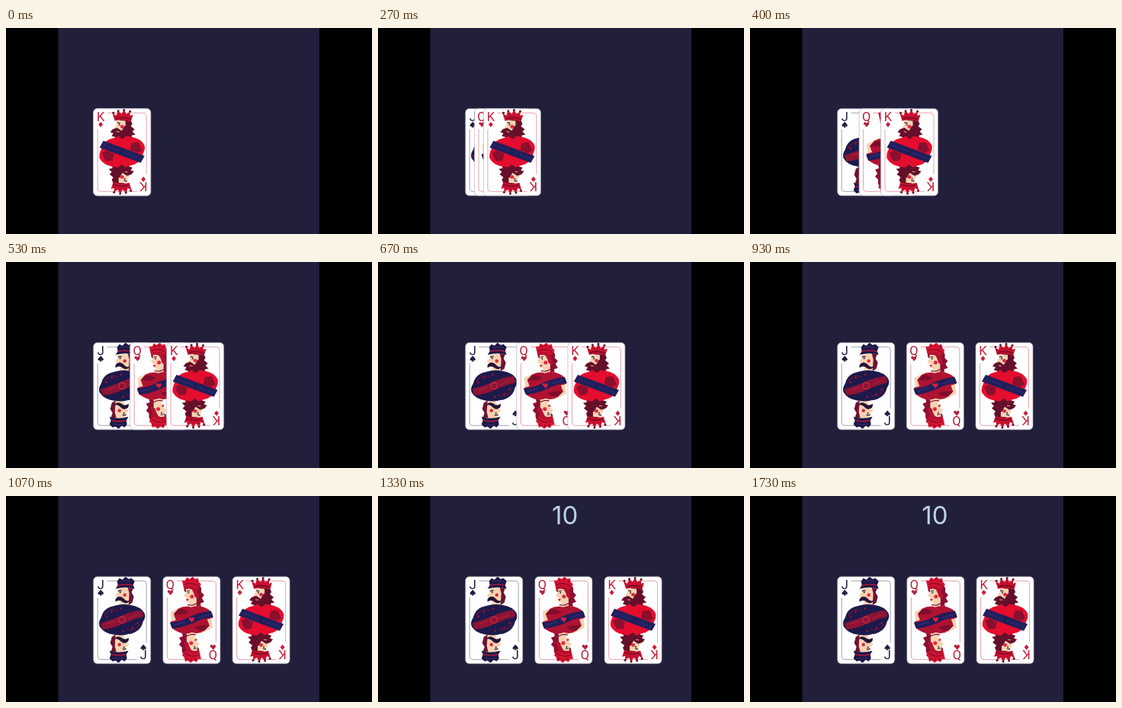
Animation, 480 px wide and 270 px high, one loop 2.19 s. Source, as an HTML page:

```html
<!DOCTYPE html>
<html lang="en">
<head>
<meta charset="utf-8">
<title>Three cards</title>
<style>
  html, body { margin: 0; width: 100%; height: 100%; overflow: hidden; background: #000; }
  svg { display: block; width: 480px; height: 270px; }
  text { font-family: Roboto, "Liberation Sans", sans-serif; text-anchor: middle; }
  #count { font-family: Inter, Roboto, sans-serif; }
</style>
</head>
<body>
<svg viewBox="0 0 480 270">
  <defs>
    <path id="spade" d="M0-3.8C1-2 3.7-.7 3.7 1.2C3.7 2.9 1.6 3 .6 1.8L1.5 3.8H-1.5L-.6 1.8C-1.6 3-3.7 2.9-3.7 1.2C-3.7-.7-1-2 0-3.8Z"/>
    <path id="heart" d="M0 3.6C-1-.1-3.6.6-3.6-1.4C-3.6-3.7-.8-3.8 0-1.8C.8-3.8 3.6-3.7 3.6-1.4C3.6.6 1 2 0 3.6Z"/>
    <path id="diamond" d="M0-3.5L3 0L0 3.5L-3 0Z"/>

    <g id="jackHead">
      <path fill="#6d1233" d="M43 14L52 15L50 21L53 26L51 34L45 38L41 30Z"/>
      <path fill="#f6d3b3" d="M33 14H45L47 22L46 38H34L35 33L31 31L32 27L28 25L32 20Z"/>
      <path fill="#1c1846" d="M31 6L34 2L38 4L42 0L46 3L50 2L54 6L52 11L54 16Q42 12 29 16L32 11Z"/>
      <path fill="none" stroke="#a3173a" stroke-width="1.8" d="M32 11.5Q42 8.5 52 11.5"/>
      <path fill="none" stroke="#3c2c6c" d="M35 6.5Q42 4 50 6.5"/>
      <path fill="#241535" d="M31 27Q36 24 40 29Q43 33 48 31Q44 37 38 33Q34 29 29 33Q28 29 31 27Z"/>
      <circle cx="41" cy="24" r="2.2" fill="#e3263f"/>
      <path stroke="#241535" stroke-width="1.3" d="M32 18.5L37 18"/>
      <circle cx="35" cy="20.5" r="1" fill="#241535"/>
    </g>
    <g id="jackBody">
      <path fill="#1d1a4b" d="M28 38Q37 35 48 37Q62 39 67 48Q69 54 65 59Q63 69 54 73Q47 76 47 75Q38 78 27 76Q13 74 8 65Q6 59 10 54Q12 44 21 40Z"/>
      <path fill="#8e1434" d="M9 61Q24 57 37 51Q50 45 63 44L66 52Q51 56 38 62Q25 68 12 69Z"/>
      <path fill="none" stroke="#5a1539" stroke-width="1.5" d="M14 51Q22 40 32 45M61 62Q53 73 43 68"/>
      <path fill="none" stroke="#c32b45" stroke-width=".8" d="M18 62L29 58M46 55L57 50"/>
      <circle cx="37.5" cy="56.5" r="4.2" fill="none" stroke="#cf2c48" stroke-width="1.1"/>
      <g fill="#a3173a">
        <circle cx="17" cy="52" r="1.2"/><circle cx="24" cy="46" r="1.2"/><circle cx="36" cy="42" r="1.2"/>
        <circle cx="58" cy="61" r="1.2"/><circle cx="51" cy="67" r="1.2"/><circle cx="39" cy="71" r="1.2"/>
      </g>
    </g>

    <g id="queenHead">
      <path fill="#8c1030" d="M27 12L44 9Q52 12 50 20L54 24L51 28L54 33L49 35L50 39L40 38L36 26L28 19Z"/>
      <path fill="#f6d3b3" d="M30 16L41 15L44 25L44 39H31L35 34L30 32L31 28L27 25L30 21Z"/>
      <path fill="#b51132" d="M28 17Q26 10 35 10L44 14L48 28Q41 29 41 23L38 17Q33 14 28 17Z"/>
      <path fill="#d5122f" d="M25 5L29 5L31 1L35 3L39 0L42 3L46 2L47 7L50 10L46 16Q36 9 27 14Z"/>
      <path fill="none" stroke="#7d0e2c" stroke-width="1.2" d="M28 10.5Q38 6 47 13"/>
      <g fill="#7d0e2c">
        <circle cx="32" cy="5" r="1"/><circle cx="38" cy="4" r="1"/><circle cx="44" cy="6" r="1"/>
      </g>
      <circle cx="38" cy="26" r="2.5" fill="#e3263f"/>
      <path fill="#c9122f" d="M30 29.5L34 29L32 32Z"/>
      <path fill="none" stroke="#7d0e2c" stroke-width="1.2" d="M32 36.5Q38 39 44 35"/>
      <path stroke="#29203c" stroke-width="1.1" d="M31 19L35 18.5"/>
      <circle cx="33.5" cy="21" r="1" fill="#29203c"/>
    </g>
    <g id="queenBody">
      <path fill="#f6d3b3" d="M25 39H51L62 46L64 57L65 67L51 74H24L13 67L11 56L10 46Z"/>
      <path fill="#b01232" d="M20 42Q29 37 37 40Q46 36 56 41Q66 45 65 54L58 56L61 64L54 71Q46 76 38 73Q29 77 19 72Q9 68 10 59L17 57L14 49Z"/>
      <path fill="#7d0e2c" d="M14 49Q25 51 34 47Q28 41 20 43ZM61 64Q50 62 41 66Q47 72 55 70Z"/>
      <path fill="#211d59" d="M9 60Q24 59 36 52Q50 46 63 45L66 53Q52 54 39 61Q25 67 12 68Z"/>
      <path fill="none" stroke="#423b80" stroke-width=".8" d="M14 64L29 59M46 54L61 49"/>
      <use href="#heart" x="37.5" y="56.5" fill="#d5213f"/>
    </g>

    <g id="kingHead">
      <path fill="#65102a" d="M34 13L49 15L51 20L49 23L54 27L51 30L55 34L50 35L51 40L38 40Z"/>
      <path fill="#f6d3b3" d="M31 15L42 16L42 30L32 31L27 26L30 21Z"/>
      <path fill="#65102a" d="M25 27L31 25L37 29L41 22L48 28L47 40H30L28 37L24 36L26 32L22 31Z"/>
      <path fill="#c80f2d" d="M25 6L30 9L32 3L37 7L40 1L43 7L48 4L48 9L52 8L49 17Q39 13 28 16Z"/>
      <g fill="#65102a">
        <circle cx="26" cy="5.5" r="1.5"/><circle cx="32.5" cy="3" r="1.5"/>
        <circle cx="40" cy="1.8" r="1.5"/><circle cx="48" cy="3.5" r="1.5"/>
      </g>
      <path fill="none" stroke="#65102a" stroke-width="1.4" d="M29 13Q39 10 49 14"/>
      <circle cx="37.5" cy="23.5" r="2.4" fill="#e3263f"/>
      <path stroke="#29203c" stroke-width="1.2" d="M31 18L35 19"/>
      <circle cx="34" cy="21" r="1" fill="#29203c"/>
      <path stroke="#e7a99b" stroke-width="1" d="M30 30L34 30.5"/>
    </g>
    <g id="kingBody">
      <path fill="#e40d2e" d="M28 38L33 36L38 40L43 36L50 37Q62 39 67 48Q68 54 65 59Q63 69 54 73L47 75L42 77L37 73L32 77L25 76Q13 74 8 65Q7 59 10 54Q12 44 21 40Z"/>
      <path fill="#8a0f2d" d="M11 58L17 55L27 59L25 68L16 69ZM64 55L58 58L48 54L50 45L59 44Z"/>
      <path fill="#211f5c" d="M13 42L67 62L62 71L8 51Z"/>
      <path fill="none" stroke="#3b3b80" stroke-width=".9" stroke-dasharray="2 2" d="M14 47.5L61 65.5"/>
      <circle cx="37.5" cy="56.5" r="2" fill="none" stroke="#151738"/>
    </g>
  </defs>
  <rect x="68.5" width="342.5" height="270" fill="#221f3b"/>
  <g id="cards"></g>
  <text id="count" y="37" font-size="33" fill="#bdd3e2">10</text>
</svg>
<script>
const FRAME = 1000 / 15, LOOP = 2190;
const clamp = v => Math.max(0, Math.min(1, v));
const smooth = (t, from, to) => {
  const u = clamp((t - from) / (to - from));
  return u * u * (3 - 2 * u);
};

function card(letter, suit, name, ink, flip) {
  const index = `<text x="9.5" y="16.5" font-size="16.5" fill="${ink}">${letter}</text>`;
  const pip = `<use href="#${suit}" fill="${ink}"`;
  const lower = flip
    ? `<g transform="rotate(180 37.5 56.5)">${index}</g>`
    : `<g transform="translate(56 91.5)">${index}</g>`;
  return `<g>
    <rect width="75" height="114" rx="5" fill="#fff" stroke="#aaa6b8" stroke-width=".6"/>
    <path d="M18 5.5H65Q69.5 5.5 69.5 10V86M5.5 27V104Q5.5 108.5 10 108.5H57"
      fill="none" stroke="${ink}" stroke-width=".7" opacity=".6"/>
    <use href="#${name}Head"/>
    <use href="#${name}Head" transform="rotate(180 37.5 56.5)"/>
    <use href="#${name}Body"/>
    ${index}${pip} x="9.5" y="20.8"/>${lower}${pip} x="65.5" y="92.5"/>
  </g>`;
}

const deck = document.getElementById("cards");
deck.innerHTML = card("J", "spade", "jack", "#211f43")
  + card("Q", "heart", "queen", "#b51f3c")
  + card("K", "diamond", "king", "#c91f3b", true);
const count = document.getElementById("count");

function draw(now) {
  // The motion advances in steps of one fifteenth of a second.
  const t = Math.floor((now % LOOP + 4) / FRAME) * FRAME;
  const gap = 91.2 * smooth(t, 60, 975);
  [...deck.children].forEach((c, i) =>
    c.setAttribute("transform", `translate(${114.7 + i * gap} 105.8)`));
  count.setAttribute("x", 245.2 - 2.8 * smooth(t, 1320, 1600));
  count.setAttribute("opacity", smooth(t, 1070, 1270));
}

const start = performance.now();
function tick() {
  draw(performance.now() - start);
  requestAnimationFrame(tick);
}
tick();
</script>
</body>
</html>
```
